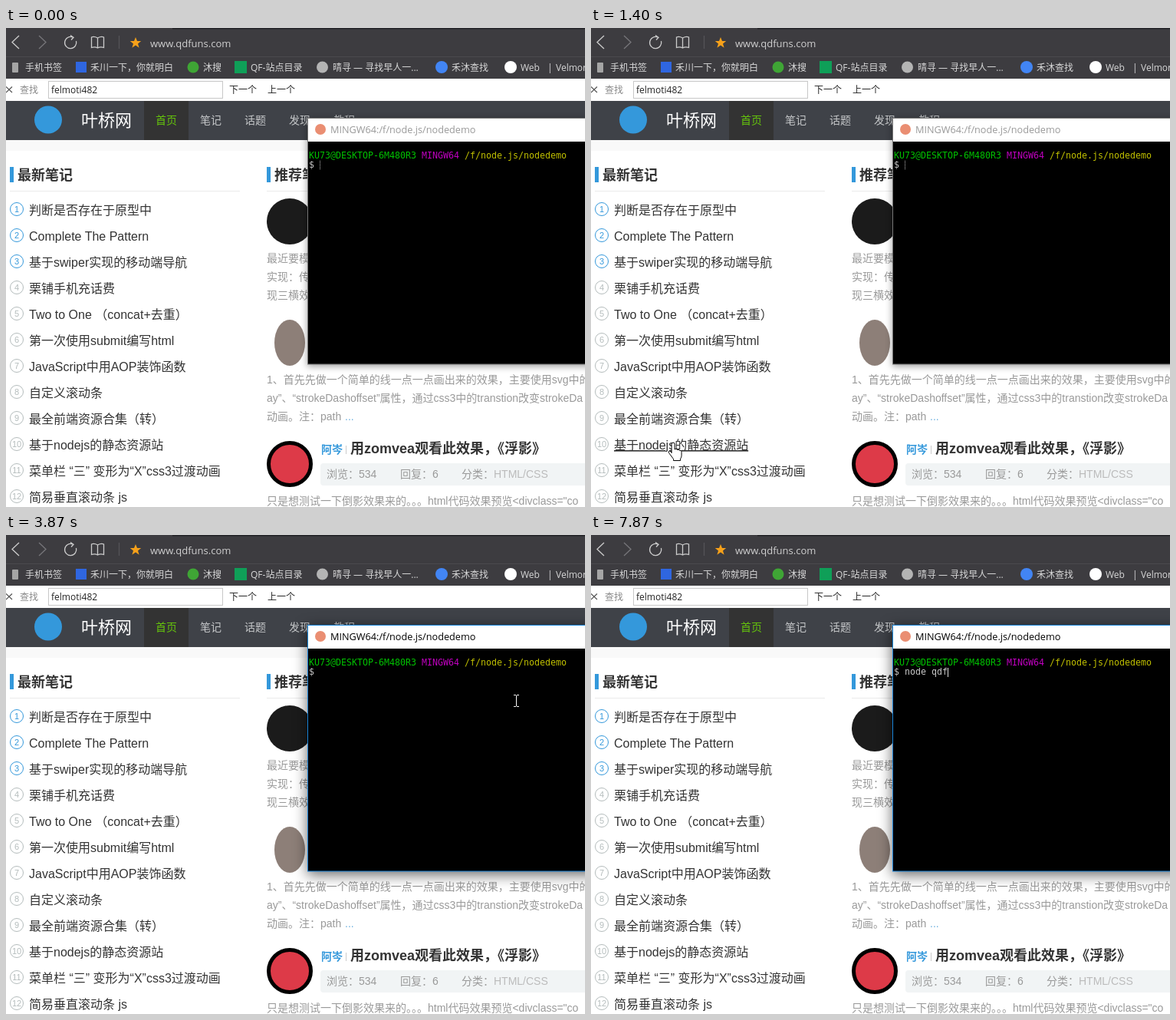
An HTML page for the animation above (8000 ms loop, 755 px wide and 624 px high).

```html
<!DOCTYPE html>
<html lang="zh-CN">
<head>
<meta charset="utf-8">
<style>
  html, body { margin: 0; width: 100%; height: 100%; overflow: hidden; background: #fff; }
  svg { display: block; }
  text { white-space: pre; }
  .ui { font-family: "Open Sans", "Noto Sans CJK SC", "Noto Sans CJK", sans-serif; }
  .page { font-family: "Liberation Sans", "Noto Sans CJK SC", "Noto Sans CJK", sans-serif; }
  .term { font-family: "DejaVu Sans Mono", monospace; font-size: 11.63px; }
  .hover { text-decoration: underline; }
  .blue { fill: #2d83c4; }
  #frame { stroke: #777; filter: drop-shadow(0 2px 5px #0006); }
  #title { fill: #999; }
  #caret { stroke: #bbb; stroke-dasharray: 1 1; }
  .active #frame { stroke: #1883d7; filter: drop-shadow(0 4px 9px #0009); }
  .active #title { fill: #000; }
  .active #caret { stroke: #ddd; stroke-dasharray: none; }
</style>
</head>
<body>
<svg id="stage" width="755" height="624" viewBox="0 0 755 624">
  <!-- toolbar and bookmarks -->
  <rect width="755" height="66" fill="#3d3c40"/>
  <rect x="217" width="538" height="1.5" fill="#232326"/>
  <path d="M0 37.5H755" stroke="#4b4a4e"/>
  <g fill="none" stroke="#ccc" stroke-width="1.3">
    <path d="M17 10L8 18.5L17 27"/>
    <path d="M43 10L52 18.5L43 27" stroke="#77767a"/>
    <path d="M91.5 17A7.6 7.6 0 1 1 87 12M84 9.5L88 12.3L85 15.5"/>
    <path d="M119.5 13Q115 10.5 111.5 12V25.5Q116 24 119.5 26Q123 24 127.5 25.5V12Q124 10.5 119.5 13V26"/>
    <path d="M147.5 10V27" stroke="#555458"/>
  </g>
  <path d="M169 12l2 5h5.2l-4.2 3.4 1.6 5.4-4.6-3.2-4.6 3.2 1.6-5.4-4.2-3.4h5.2z" fill="#f7a11a"/>
  <rect x="8" y="45" width="8" height="13" rx="1" fill="#a5a5a5"/>
  <rect x="91" y="44" width="14" height="14" fill="#2f66e0"/>
  <circle cx="244" cy="51" r="7.5" fill="#3fa535"/>
  <rect x="298" y="43" width="16" height="16" fill="#0f9f58"/>
  <circle cx="412.5" cy="51" r="7.5" fill="#b4b4b4"/>
  <circle cx="568" cy="51" r="8" fill="#4285f4"/>
  <circle cx="658" cy="51" r="8" fill="#fff"/>

  <!-- find bar -->
  <path d="M0 76.5L8 84M0 84L8 76.5" stroke="#555" stroke-width="1.2"/>
  <rect x="55.5" y="69.5" width="227" height="22" fill="#fff" stroke="#c8c8c8"/>

  <!-- site header -->
  <rect y="95" width="755" height="51" fill="#3f4248"/>
  <rect x="180" y="95" width="58" height="51" fill="#333"/>
  <rect y="146" width="755" height="14" fill="#f9f9f9"/>
  <circle cx="55" cy="119.5" r="18" fill="#3498db"/>

  <!-- columns -->
  <path d="M5 181h5v20h-5zM340 181h5v20h-5z" fill="#3498db"/>
  <path d="M5 212.5H305M340 212.5H755" stroke="#eaeaea"/>
  <circle cx="370" cy="252" r="30" fill="#1b1b1b"/>
  <ellipse cx="370" cy="410" rx="20" ry="30" fill="#8d7f78"/>
  <circle cx="370" cy="568" r="27.5" fill="#dd3a48" stroke="#000" stroke-width="5"/>
  <rect x="410" y="567" width="360" height="29" rx="4" fill="#f1f4f5"/>
  <path d="M443.5 544V555" stroke="#ccc"/>
  <g id="content"></g>

  <!-- terminal window -->
  <g id="window">
    <rect id="frame" x="393.5" y="117.5" width="400" height="320.5"/>
    <rect x="394" y="118" width="400" height="30" fill="#fff"/>
    <circle cx="410" cy="132" r="7" fill="#ea8e72"/>
    <text id="title" class="ui" x="423" y="137" font-size="12.7">MINGW64:/f/node.js/nodedemo</text>
    <text class="term" x="395" y="170"><tspan fill="#00c200">KU73@DESKTOP-6M480R3</tspan><tspan fill="#c000c0"> MINGW64</tspan><tspan fill="#c0c000"> /f/node.js/nodedemo</tspan></text>
    <text id="prompt" class="term" x="395" y="182" fill="#c8c8c8"></text>
    <path id="caret" d="M0 173V185"/>
  </g>

  <g id="pointer">
    <path id="hand" fill="#fff" stroke="#000" d="M-2 13V2a2 2 0 0 1 4 0v7a2 2 0 0 1 3.5 .5a2 2 0 0 1 3 1a1.8 1.8 0 0 1 2.5 1.7v5q0 2-1.5 4v2.3h-9v-2l-6-8q-1-2.5 1-2.5q1.5 0 2.5 2.5z"/>
    <path id="arrow" fill="#fff" stroke="#000" d="M0 0V16l3.7-3.5 2.5 6 2.4-1-2.5-5.8H11z"/>
    <path id="beam" fill="none" stroke="#fff" d="M-3.5-7.5h3M.5-7.5h3M0-7v14M-3.5 7.5h3M.5 7.5h3"/>
  </g>
</svg>
<script>
const $ = id => document.getElementById(id);
const content = $('content');

function add(tag, attrs, text = '') {
  const node = document.createElementNS('http://www.w3.org/2000/svg', tag);
  for (const key in attrs) node.setAttribute(key, attrs[key]);
  node.textContent = text;
  return content.appendChild(node);
}
const label = (font, size, fill, x, y, text, more) =>
  add('text', { class: font, 'font-size': size, fill, x, y, ...more }, text);
const bold = { 'font-weight': 700 };

// Browser labels
label('ui', 13, '#d0d0d0', 188, 25, 'www.qdfuns.com');
[[25, '手机书签'], [110, '禾川一下，你就明白'], [257, '沐搜'], [319, 'QF-站点目录'],
 [426, '晴寻 — 寻找早人一...'], [581, '禾沐查找'], [671, 'Web'], [706, '|'], [717, 'Velmor']
].forEach(([x, text]) => label('ui', 12, '#d8d8d8', x, 56, text));
label('ui', 12, '#888', 18, 85, '查找');
label('ui', 12, '#222', 59, 85, 'felmoti482');
label('ui', 12, '#222', 291, 85, '下一个');
label('ui', 12, '#222', 341, 85, '上一个');

// Site labels
label('page', 22, '#fff', 98, 128, '叶桥网');
['首页', '笔记', '话题', '发现', '教程'].forEach((text, i) =>
  label('page', 14, i ? '#c4c6c8' : '#66c60c', 195 + 58 * i, 125, text));
label('page', 18, '#333', 15, 198, '最新笔记', bold);
label('page', 18, '#333', 350, 198, '推荐笔记', bold);

const items = ['判断是否存在于原型中', 'Complete The Pattern', '基于swiper实现的移动端导航',
  '栗铺手机充话费', 'Two to One （concat+去重）', '第一次使用submit编写html',
  'JavaScript中用AOP装饰函数', '自定义滚动条', '最全前端资源合集（转）',
  '基于nodejs的静态资源站', '菜单栏 “三” 变形为“X”css3过渡动画', '简易垂直滚动条 js'
].map((text, i) => {
  const y = 236 + 34 * i, color = i < 3 ? '#3498db' : '#b4bcbc';
  add('circle', { cx: 14, cy: y, r: 8.5, fill: 'none', stroke: color });
  label('page', 11, color, 14, y + 4, i + 1, { 'text-anchor': 'middle' });
  return label('page', 16, '#333', 30, y + 7, text);
});

[[305, '最近要模'], [329, '实现：传'], [353, '现三横效'],
 [463, '1、首先先做一个简单的线一点一点画出来的效果，主要使用svg中的'],
 [487, 'ay”、“strokeDashoffset”属性，通过css3中的transtion改变strokeDa'],
 [511, '动画。注：path '],
 [621, '只是想测试一下倒影效果来的。。。html代码效果预览<divclass="co']
].forEach(([y, text]) => label('page', 14, '#999', 340, y, text));
label('page', 14, '#6fb1e0', 442, 511, '...');
label('page', 14, '#3498db', 411, 554, '阿岑', bold);
label('page', 18, '#333', 449, 554, '用zomvea观看此效果，《浮影》', bold);
label('page', 14, '#999', 418, 586, '浏览：534');
label('page', 14, '#999', 514, 586, '回复：6');
label('page', 14, '#999', 594, 586, '分类：');
label('page', 14, '#bbb', 636, 586, 'HTML/CSS');

// Pointer hot spot: time, x, y
const path = [[333, 100, 596], [467, 112, 440], [600, 127, 290], [733, 131, 207], [867, 130, 253],
  [933, 130, 258], [1333, 109, 530], [1400, 107, 540], [1533, 125, 551], [1667, 165, 494],
  [1733, 176, 463], [2200, 445, 195], [2333, 429.5, 187], [3267, 429.5, 187],
  [3400, 665.5, 216], [4130, 665.5, 216]];
const typed = [[0, ''], [4200, 'o'], [4330, 'on'], [4730, 'o'], [4870, ''], [5330, 'n'], [5530, 'no'],
  [5800, 'noe'], [6470, 'no'], [6530, 'nod'], [6600, 'node'], [6800, 'node '], [7130, 'node q'],
  [7330, 'node qd'], [7870, 'node qdf']];
const caretOff = [[3000, 3400], [3870, 4130], [6330, 6470]];

function pointerAt(t) {
  const i = path.findIndex(key => key[0] > t);
  if (i < 1) return null;
  const [t0, x0, y0] = path[i - 1], [t1, x1, y1] = path[i];
  const k = (t - t0) / (t1 - t0);
  return [x0 + (x1 - x0) * k, y0 + (y1 - y0) * k];
}

const widths = items.map(item => item.getComputedTextLength());
function hoveredAt(t) {
  const spot = pointerAt(t + 40); // the page reacts slightly ahead of the drawn pointer
  if (!spot) return -1;
  const [x, y] = spot, row = Math.round((y - 237) / 34);
  return Math.abs(y - 237 - 34 * row) < 9 && x > 30 && x < 30 + widths[row] ? row : -1;
}

function render(t) {
  const step = Math.floor(t * 0.015 + 0.06) / 0.015 + 0.5; // 15 pictures per second
  const spot = pointerAt(step), hovered = hoveredAt(step), before = hoveredAt(step - 133);
  items.forEach((item, i) => {
    item.classList.toggle('hover', i === hovered);
    item.classList.toggle('blue', i === hovered && i === before);
  });

  $('pointer').style.display = spot ? '' : 'none';
  if (spot) {
    const [x, y] = spot;
    const shape = x < 240 ? 'hand' : x < 394 ? 'arrow' : 'beam';
    for (const id of ['hand', 'arrow', 'beam']) $(id).style.display = id === shape ? '' : 'none';
    $('pointer').setAttribute('transform', `translate(${x} ${y})`);
  }

  const text = typed.findLast(([start]) => t >= start)[1];
  $('window').classList.toggle('active', t >= 2470);
  $('prompt').textContent = '$ ' + text;
  $('caret').setAttribute('transform', `translate(${409.5 + 7 * text.length} 0)`);
  $('caret').style.display = caretOff.some(([a, b]) => t >= a && t < b) ? 'none' : '';
}

const start = performance.now();
function tick() {
  render((performance.now() - start) % 8000);
  requestAnimationFrame(tick);
}
tick();
</script>
</body>
</html>
```
